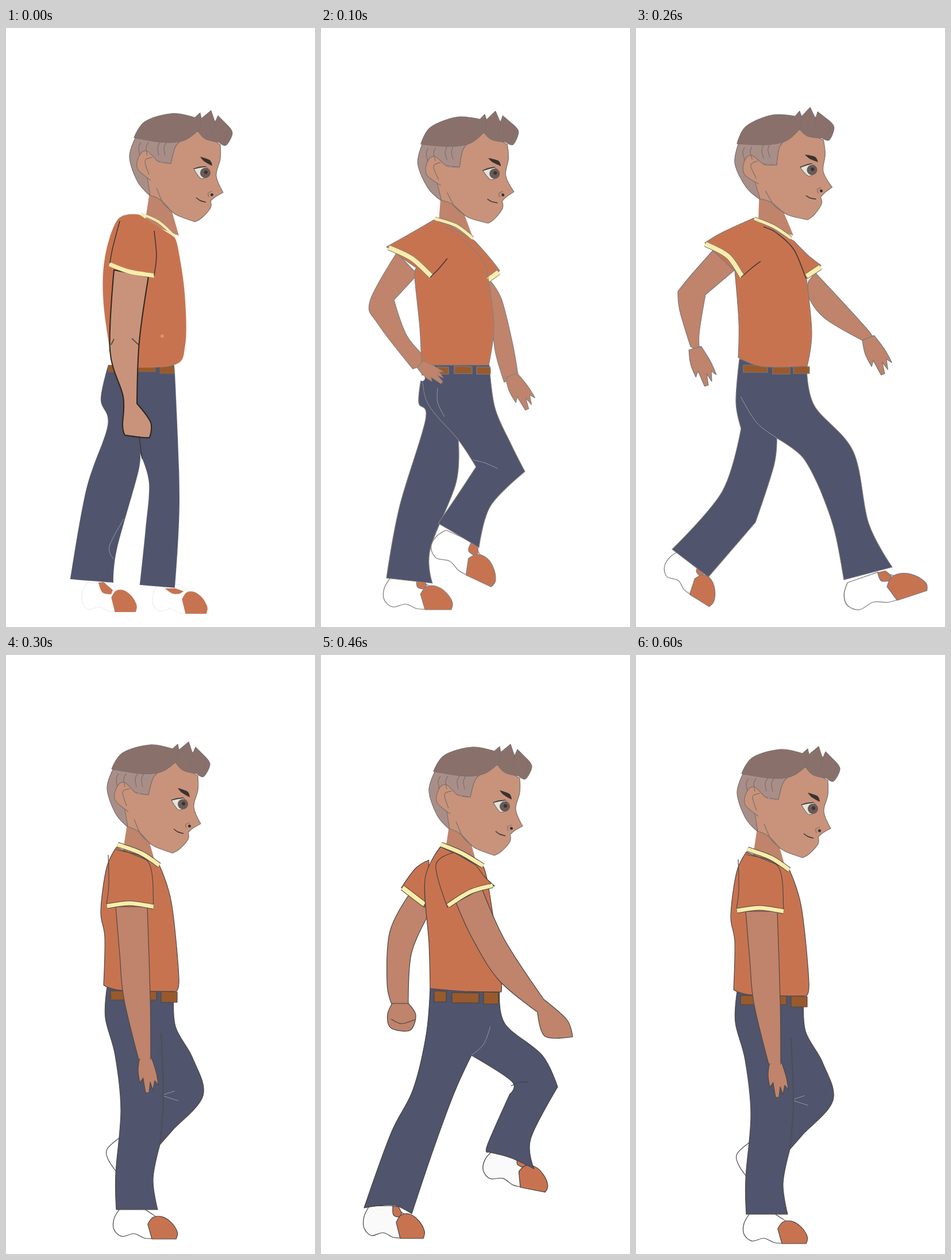
Recreate the animation shown at these times as an HTML page. Size 538 px wide and 1040 px high, loop 700 ms.

```html
<!DOCTYPE html>
<html lang="en">
<head>
<meta charset="utf-8">
<title>Walk cycle</title>
<style>
  html, body { margin: 0; width: 100%; height: 100%; overflow: hidden; background: #fff; }
  svg { display: block; width: 100vw; height: 100vh; }
  .pose { visibility: hidden; animation: show 700ms step-end infinite; animation-delay: calc(var(--i) * 100ms - 700ms); }
  @keyframes show { 0% { visibility: visible; } 14.28572% { visibility: hidden; } }
  path { stroke: var(--ink); stroke-width: 1.2; stroke-linejoin: round; }
  .head { --ink: #7b706c; }
  .face, .ear { fill: #c8937a; }
  .neck, .arm { fill: #bf846b; }
  .neck { stroke: none; }
  .limb { fill: #c8937a; stroke: #2b2622; stroke-width: 2; }
  .hair { fill: #8a706b; }
  .side { fill: #a98e88; }
  .shirt, .toe { fill: #c87350; }
  .pants { fill: #50546c; }
  .belt { fill: #985a2c; }
  .shoe { fill: var(--shoe); }
  .white { fill: #e6e2dd; }
  .iris { fill: #6a5a56; }
  .dark { fill: #3a3230; stroke: none; }
  .spot { fill: #dc9273; }
  .blank { fill: #fff; }
  .line, .pale, .ink, .edge, .trim { fill: none; }
  .pale { stroke: #9a9ba3; stroke-width: 1; }
  .ink { stroke: #3a3636; stroke-width: 1.5; }
  .trim { stroke: #fdedaa; }
</style>
</head>
<body>
<svg id="stage" viewBox="0 0 538 1040" preserveAspectRatio="none"></svg>
<script>
let out = '';
const OPEN = ['line', 'pale', 'ink', 'ear', 'edge', 'trim'];

// Smooth curve through the points; "!" marks a corner.
function shape(cls, text, style = '') {
  const pts = text.split(' ').map(w => {
    const [x, y] = w.split(',').map(parseFloat);
    return { x, y, sharp: w.endsWith('!') };
  });
  const n = pts.length, open = OPEN.includes(cls);
  const at = i => open ? pts[Math.max(0, Math.min(n - 1, i))] : pts[(i + n) % n];
  const handle = (p, from, to) => {
    const k = p.sharp ? 0 : 1 / 6;
    return `${p.x + (to.x - from.x) * k},${p.y + (to.y - from.y) * k}`;
  };
  let d = `M${pts[0].x},${pts[0].y}`;
  for (let i = 0; i < (open ? n - 1 : n); i++) {
    const a = at(i), b = at(i + 1);
    d += `C${handle(a, at(i - 1), b)} ${handle(b, at(i + 2), a)} ${b.x},${b.y}`;
  }
  out += `<path class="${cls}" d="${d}${open ? '' : 'Z'}" style="${style}"/>`;
}

const line = text => shape('line', text);
const pale = text => shape('pale', text);
const ink = text => shape('ink', text);
const arm = text => shape('arm', text);
const pants = text => shape('pants', text);
const shirt = text => shape('shirt', text);
const dot = (cls, x, y, r) => { out += `<circle class="${cls}" cx="${x}" cy="${y}" r="${r}"/>`; };
const belt = (x, y, w, h = 13) => shape('belt', `${x},${y}! ${x + w},${y + 1}! ${x + w},${y + h}! ${x},${y + h}!`);

function band(text, w = 8) {
  shape('edge', text, `stroke-width:${w + 2}`);
  shape('trim', text, `stroke-width:${w}`);
}

function place(x, y, turn, sx, sy, draw) {
  out += `<g transform="translate(${x} ${y}) rotate(${turn}) scale(${sx} ${sy})">`;
  draw();
  out += '</g>';
}

const shoe = (x, y, turn, sx, sy, ankle = true) => place(x, y, turn, sx, sy, () => {
  shape('shoe', '9,-56! 0,-38 0,-18 13,-5 33,-10 50,-2 63,-1! 70,-42! 50,-57!');
  if (ankle) shape('toe', '50,-56! 51,-41 60,-37! 65,-43 60,-55!');
  shape('toe', '56,-28! 65,-41 80,-42 95,-31 105,-13 103,0! 63,0!');
});

const hand = (x, y, turn, s) => place(x, y, turn, s, s, () =>
  arm('-10,-4! -14,18 -12,40! -6,32! -3,58! 3,58! 6,40! 10,54! 14,38! 20,46! 17,22 10,-4!'));

const fist = (x, y, turn, s) => place(x, y, turn, s, s, () => {
  arm('-14,0! -22,18 -20,38 -8,46 18,46 27,20 14,0!');
  line('-16,27 2,35 26,28');
});

function head(x, y, turn = 0) {
  out += `<g class="head" transform="translate(${x} ${y}) rotate(${turn} 290 344)">`;
  shape('neck', '213,280! 203,345! 262,368! 250,326!');
  shape('side', '186,199! 176,232 190,274 211,298! 222,238! 248,243! 256,214 268,202!');
  shape('face', '295,186! 334,210! 334,235 327,264 339,293! 325,301 317,308! 317,320 302,337 290,344! 262,334 249,326! 230,306 212,298! 207,268! 212,232! 230,241! 248,243! 256,214 268,202!');
  shape('ear', '213,272 190,252 193,229 206,221 224,238');
  line('216,232 203,238 210,262');
  line('223,285 235,312 250,326');
  for (const x of [196, 209, 229, 240]) line(`${x},206 ${x - 4},215 ${x - 2},229`);
  shape('hair', '184,198! 203,170 250,156 290,163! 299,155! 301,165! 318,151! 325,172! 330,160! 345,175! 355,190 344,211 332,206! 308,200 295,186! 270,203 235,206');
  line('300,160 300,175 295,188');
  line('325,168 324,180 318,193');
  line('345,175 347,190 341,204');
  shape('white', '288,252! 309,248! 316,260 301,269');
  dot('iris', 308, 259, 9);
  dot('dark', 309, 258, 3);
  ink('288,252 299,249 309,248');
  shape('dark', '299,231! 316,237 320,247! 306,239');
  line('314,301 313,294 320,291');
  dot('dark', 319.5, 297, 2.5);
  ink('292,302 299,307 309,310');
  out += '</g>';
}

function stand() {
  shoe(133, 1014, 0, 0.9, 0.9, false);
  shoe(256, 1017, 0, 0.9, 0.9, false);
  shape('toe', '161,963! 168,980 183,983! 186,976! 170,962!');
  shape('toe', '277,973! 290,982 303,982! 309,978! 295,973!');
  pants('178,585! 165,645 177,690 140,800 112,957! 187,963! 193,905 230,772 233,738! 249,790 243,870 233,967! 294,972! 302,820 295,620 292,585!');
  ink('232,710 237,748');
  pale('205,852 180,900 187,922');
  belt(178, 586, 82, 11);
  belt(268, 587, 25);
  head(39, -7.5);
  shirt('232,324! 195,332 172,400 170,480 186,588! 290,586 312,550 311,460 299,380 292,362!');
  band('235,323 265,336 293,361', 4);
  dot('spot', 272, 535, 3);
  shape('limb', '188,420! 181,560 204,640 203,690 207,707! 238,711 250,711! 252,685 228,652! 232,545 248,432!');
  ink('183,550 188,540');
  ink('219,539 231,550');
  band('180,410 215,423 258,430', 7);
  ink('198,335 185,385 181,408');
  ink('258,352 262,395 258,430');
}

function lift() {
  arm('293,437! 314,470 333,545 343,602! 319,615! 303,560 298,500');
  hand(333, 607, -25, 1.05);
  shoe(110, 1010, 0, 1.13, 0.97);
  pants('176,600! 170,650 182,680 137,830 114,955! 194,964! 190,905 235,790 239,715! 210,650!');
  shoe(184, 918, 25, 1.2, 1);
  pants('176,585! 185,650 239,715 270,762! 235,815 204,860! 235,878 275,902! 295,830 355,770! 332,725 303,660 293,585!');
  pale('203,625 203,650 215,675');
  pale('265,750 285,755 308,765');
  belt(203, 588, 19);
  belt(232, 587, 31);
  belt(271, 588, 24);
  head(1, -5, -4.5);
  arm('132,390! 85,475 100,515 160,592! 190,580! 150,535 127,472! 168,428!');
  shirt('202,330! 150,360 114,380! 168,418! 163,430 172,520 175,585! 292,585! 301,520 292,441! 311,421! 292,397 268,370!');
  hand(175, 586, -50, 0.8);
  dot('blank', 176, 608, 5);
  band('118,381 158,400 192,431');
  band('309,424 291,437');
  band('198,331 235,343 264,365', 5);
  ink('190,433 205,418 220,400');
  line('218,345 262,380 285,410 292,440');
}

function stride() {
  arm('300,440! 312,425! 345,460 400,520 413,538! 399,545! 330,505 302,470');
  hand(406, 542, -22, 1.1);
  shoe(40, 950, 32, 1, 1);
  shoe(374, 1020, -18, 1.35, 1);
  pants('180,575! 174,650 183,695! 150,805 63,905! 126,953! 208,858! 240,760 245,712! 290,745 320,800! 345,870 362,958! 446,936! 405,860 378,735 310,655 297,585!');
  pale('182,640 210,685 245,712');
  belt(187, 585, 42);
  belt(238, 588, 30);
  belt(274, 587, 28);
  head(9, -11, -7);
  arm('135,385! 95,430 73,457! 76,490 95,553! 111,563! 110,530 121,463! 172,420!');
  hand(104, 560, -17, 1.1);
  shirt('205,330! 150,355 120,373! 172,422! 179,510 178,572! 220,588 298,587! 306,530 297,436! 322,412! 300,395 275,370!');
  band('121,375 160,396 185,432');
  band('321,415 297,431');
  band('206,331 240,345 270,365', 5);
  ink('183,433 200,418 217,405');
  ink('222,345 245,356 275,385 296,435');
}

function pass() {
  shape('shoe', '198,838! 176,858 178,876 192,897!');
  shoe(188, 1014, 0, 1.05, 0.92, false);
  pants('176,576! 173,630 190,695 200,790 191,900 192,963! 264,963! 256,910 268,850! 290,825 343,765 325,700 295,645 292,584!');
  line('270,657 274,770 268,850');
  pale('275,763 294,757');
  pale('275,766 300,774');
  belt(182, 583, 80, 16);
  belt(270, 584, 28, 19);
  head(0, 0);
  shirt('192,334! 175,370 165,445 172,490 170,573! 200,582 295,584! 301,560 288,430 267,365!');
  hand(243, 702, -3, 1);
  arm('191,437! 198,520 205,595 231,702! 252,702! 251,590 246,437!');
  out += '<path class="arm" style="stroke:none" d="M234 699h17v7h-17z"/>';
  line('178,347 179,400 175,432');
  line('192,338 248,360 257,438');
  band('176,436 215,431 257,437', 7);
  band('194,329 235,344 267,365', 7);
}

function climb() {
  arm('154,415! 120,480 115,570 124,608! 152,608! 157,520 186,453! 186,430!');
  fist(138, 605, 0, 1);
  shoe(75, 1013, 0, 1, 1);
  shoe(279, 911, 11, 1.1, 0.95);
  pants('190,578! 183,660 160,755 122,830 75,960! 125,955 158,970! 195,860 232,760 262,695! 332,740 329,762! 290,850 291,863! 330,873 371,892! 365,840 412,750! 385,695 320,640 311,583!');
  pale('295,645 283,676 262,695');
  line('331,748 345,742 362,741');
  belt(197, 583, 21, 19);
  belt(228, 586, 47, 18);
  belt(283, 585, 26, 21);
  head(12, 4);
  shirt('188,356! 165,370 140,404! 180,438! 185,400!');
  band('142,404 180,433');
  shirt('208,333! 181,390 188,500 190,579! 250,584 314,585! 312,540 292,405 283,368!');
  arm('235,430! 265,495 310,565 377,620! 390,662 438,663! 428,633 388,598! 320,495 280,405!');
  shirt('232,343! 200,365 220,438! 260,415 302,401! 285,385 270,365!');
  band('221,435 260,411 299,400', 7);
  band('209,329 245,344 282,366', 7);
}

function reach() {
  arm('162,420! 115,490 94,592! 116,592! 152,530 190,455! 192,435!');
  fist(104, 592, 20, 1.1);
  shoe(20, 905, 57, 1, 0.7);
  shoe(372, 1026, -15, 1.17, 1);
  pants('203,583! 188,660 170,785 43,860! 65,890 92,922! 215,835 275,707! 318,800 357,975! 395,965 434,938! 395,865 375,740 321,588!');
  pale('292,667 288,690 275,710');
  belt(204, 590, 24, 19);
  belt(237, 592, 47, 19);
  belt(296, 595, 21, 18);
  head(22, 14);
  shirt('200,360! 170,380 147,405! 189,444! 195,400!');
  band('148,404 188,440');
  shirt('219,343! 195,385 191,465 199,586! 321,592! 315,480 295,373!');
  hand(404, 602, -35, 1.1);
  arm('244,437! 285,505 350,575 395,605! 412,598! 350,530 305,450 288,410!');
  shirt('238,352! 207,385 233,443! 270,425 310,406! 295,373!');
  band('234,441 270,424 309,404', 7);
  band('221,338 260,355 295,373', 7);
}

let index = 0;
function pose(color, draw, drop = 0, white = '#fff') {
  out += `<g class="pose" style="--i:${index++};--ink:${color};--shoe:${white}" transform="translate(0 ${drop})">`;
  draw();
  out += '</g>';
}

pose('#9993', stand);
pose('#85807f', lift);
pose('#7c7978', stride);
pose('#4c4948', pass);
pose('#454343', climb, 0, '#fafafa');
pose('#504d4c', reach);
pose('#4c4948', pass, 8);
document.getElementById('stage').innerHTML = out;
</script>
</body>
</html>
```
